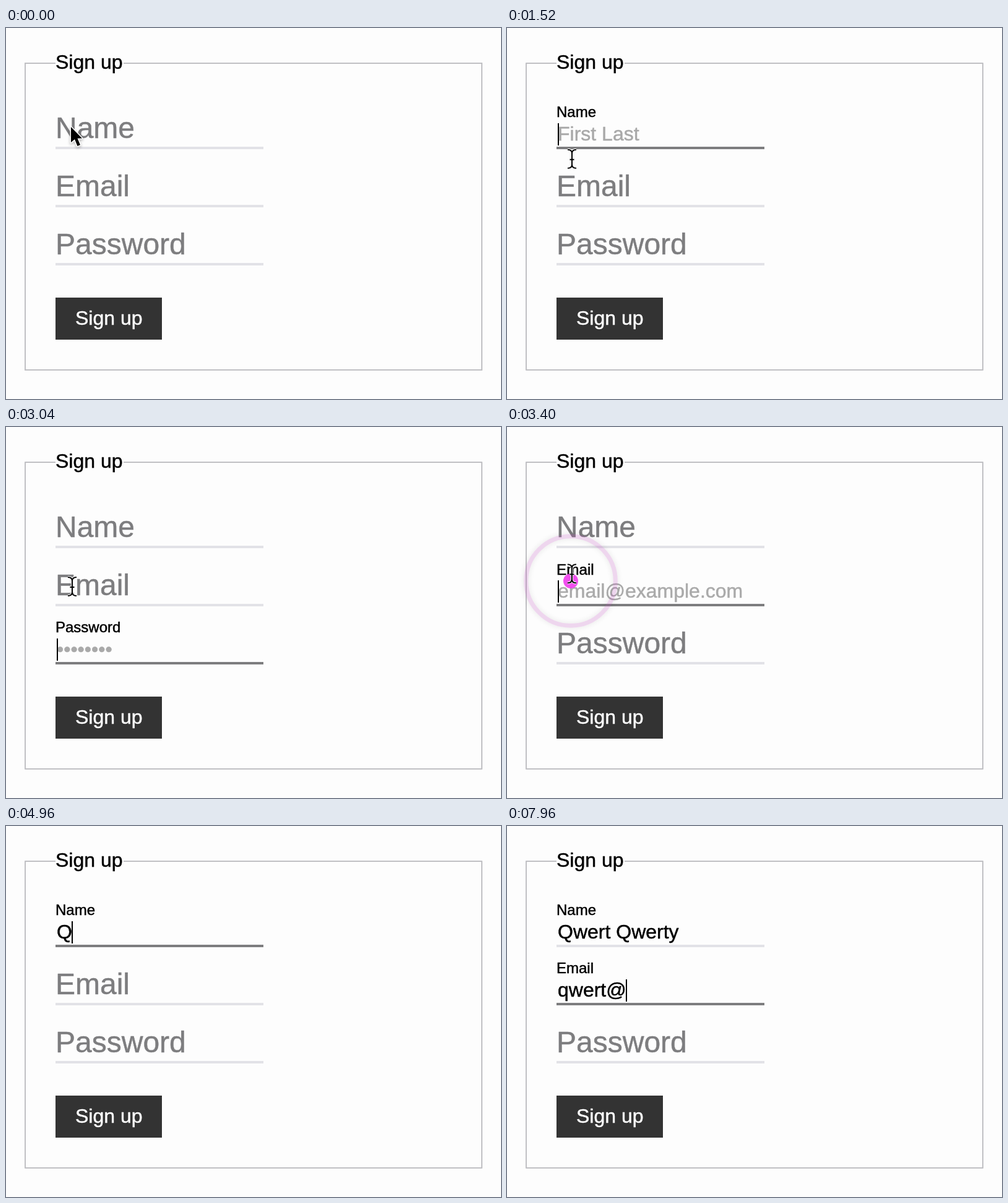
Recreate the animation shown at these times as an HTML page with a canvas. Size 800 by 600 pixels, loop 8000 ms.

```html
<!DOCTYPE html>
<html lang="en">
<head>
<meta charset="utf-8">
<title>Sign up form</title>
<style>
  html, body { margin: 0; width: 100%; height: 100%; overflow: hidden; background: #fdfdfd; }
  canvas { display: block; width: 100vw; height: 100vh; }
</style>
</head>
<body>
<canvas id="stage" width="800" height="600"></canvas>
<script>
const ctx = document.getElementById('stage').getContext('2d');
const LOOP = 8000;
const PAPER = '#fdfdfd', GREY = [125, 125, 127];
const TRANSITION = 200, FLOAT_LAG = 80;

// focus: [start, end] spans; typing: first key and gap between keys
const fields = [
  { label: 'Name', hint: 'First Last', y: 194, focus: [[1050, 1780], [3790, 6690]],
    text: 'Qwert Qwerty', firstKey: 4900, keyGap: 145 },
  { label: 'Email', hint: 'email@example.com', y: 288,
    focus: [[1780, 2560], [3150, 3790], [6690, Infinity]],
    text: 'qwert@', firstKey: 7150, keyGap: 150 },
  { label: 'Password', hint: '••••••••', y: 382, focus: [[2560, 3150]], text: '' }
];

const clicks = [[1050, 155], [1780, 247], [2560, 342], [3150, 249], [3790, 155]];

// time, x, y of the pointer
const pointerPath = [
  [0, 105, 160], [760, 105, 148], [950, 105, 157], [1250, 105, 157], [1700, 105, 248],
  [1900, 105, 248], [2160, 107, 306], [2480, 107, 343], [2720, 107, 343], [3040, 107, 258],
  [3120, 105, 250], [3350, 105, 250], [3720, 104, 157], [4900, 104, 157]
];

const clamp = v => Math.min(1, Math.max(0, v));
const mix = (a, b, p) => a + (b - a) * p;

// cubic-bezier(.25, .1, .25, 1)
function ease(x) {
  x = clamp(x);
  const curve = (u, a, b) => 3 * (1 - u) ** 2 * u * a + 3 * (1 - u) * u * u * b + u ** 3;
  let low = 0, high = 1;
  for (let i = 0; i < 20; i++) {
    const mid = (low + high) / 2;
    if (curve(mid, 0.25, 0.25) < x) low = mid; else high = mid;
  }
  return curve(low, 0.1, 1);
}

// A hairline outline gives the slightly heavy look of smoothed text.
function text(str, x, y, size, color) {
  ctx.font = `${size}px "Liberation Sans", Arial, sans-serif`;
  ctx.fillStyle = ctx.strokeStyle = color;
  ctx.lineWidth = 0.5;
  ctx.lineJoin = 'round';
  ctx.fillText(str, x, y);
  ctx.strokeText(str, x, y);
}

function rect(x, y, w, h, color) {
  ctx.fillStyle = color;
  ctx.fillRect(x, y, w, h);
}

function drawFrame() {
  rect(0, 0, 800, 600, PAPER);
  ctx.strokeStyle = '#c0c0c4';
  ctx.lineWidth = 2;
  ctx.strokeRect(31, 57, 738, 496);
  rect(80, 54, 110, 6, PAPER);
  text('Sign up', 80, 66, 32, '#000');
  rect(80, 436, 172, 68, '#333');
  text('Sign up', 112, 480, 32, '#fff');
}

function drawField(field, t) {
  const { y, firstKey, keyGap } = field;
  const typed = field.text ? Math.min(field.text.length, Math.floor((t - firstKey) / keyGap) + 1) : 0;
  const value = field.text.slice(0, Math.max(0, typed));
  const active = field.focus.find(([start, end]) => t >= start && t < end);

  let raised = 0;
  for (const [start, end] of field.focus) {
    const rise = ease((t - start - FLOAT_LAG) / TRANSITION);
    const fall = value ? 0 : ease((t - end) / TRANSITION);
    raised = Math.max(raised, rise * (1 - fall));
  }

  rect(80, y - 2, 336, 4, active ? `rgb(${GREY})` : '#e2e2e7');
  if (value) {
    text(value, 82, y - 12, 32, '#000');
  } else {
    ctx.globalAlpha = raised;
    text(field.hint, 82, y - 12, 32, '#a9a9a9');
    ctx.globalAlpha = 1;
  }

  const color = GREY.map(c => Math.round(mix(c, 0, raised)));
  const baseline = mix(y - 16, y - 50, raised ** 1.3);
  text(field.label, 80, baseline, mix(48, 24, raised), `rgb(${color})`);

  if (active) {
    const lastChange = value ? firstKey + (typed - 1) * keyGap : active[0];
    if ((t - lastChange) % 1000 < 500) {
      ctx.font = '32px "Liberation Sans", Arial, sans-serif';
      rect(Math.round(82 + ctx.measureText(value).width - 0.4), y - 40, 2, 36, '#000');
    }
  }
}

function drawClick([start, y], t) {
  const age = t - start;
  if (age < 0 || age > 460) return;
  const circle = radius => {
    ctx.beginPath();
    ctx.arc(103, y, radius, 0, 2 * Math.PI);
  };
  ctx.save();
  if (age < 290) {
    ctx.globalAlpha = 1 - age / 300;
    ctx.strokeStyle = '#e050e0';
    ctx.lineWidth = 7;
    ctx.shadowColor = 'rgba(0, 0, 0, .6)';
    ctx.shadowBlur = 10;
    circle(10 + 72 * age / 290);
    ctx.stroke();
    ctx.shadowColor = 'transparent';
  }
  ctx.globalAlpha = 0.9 * clamp((460 - age) / 200);
  ctx.fillStyle = '#f03cec';
  circle(12);
  ctx.fill();
  ctx.restore();
}

const arrow = new Path2D('M0 0V25L6 20L10.5 31L15 29L10.5 18.5H18Z');
const beam = new Path2D(
  'M-7 -15Q0 -15 0 -9Q0 -15 7 -15M0 -9V9M-7 15Q0 15 0 9Q0 15 7 15M-3.5 1H3.5');

function drawPointer(t) {
  const next = pointerPath.findIndex(point => point[0] > t);
  if (next < 0) return;
  const [t0, x0, y0] = pointerPath[next - 1], [t1, x1, y1] = pointerPath[next];
  const p = (t - t0) / (t1 - t0);
  ctx.save();
  ctx.translate(mix(x0, x1, p), mix(y0, y1, p));
  ctx.lineJoin = 'round';
  ctx.strokeStyle = '#fff';
  if (t < 900) {
    ctx.shadowColor = 'rgba(0, 0, 0, .3)';
    ctx.shadowBlur = 4;
    ctx.shadowOffsetY = 2;
    ctx.lineWidth = 3;
    ctx.stroke(arrow);
    ctx.shadowColor = 'transparent';
    ctx.fillStyle = '#000';
    ctx.fill(arrow);
  } else {
    ctx.lineWidth = 4;
    ctx.stroke(beam);
    ctx.strokeStyle = '#000';
    ctx.lineWidth = 2;
    ctx.stroke(beam);
  }
  ctx.restore();
}

function render(now) {
  const t = now % LOOP;
  drawFrame();
  fields.forEach(field => drawField(field, t));
  clicks.forEach(click => drawClick(click, t));
  drawPointer(t);
  requestAnimationFrame(render);
}
requestAnimationFrame(render);
</script>
</body>
</html>
```
